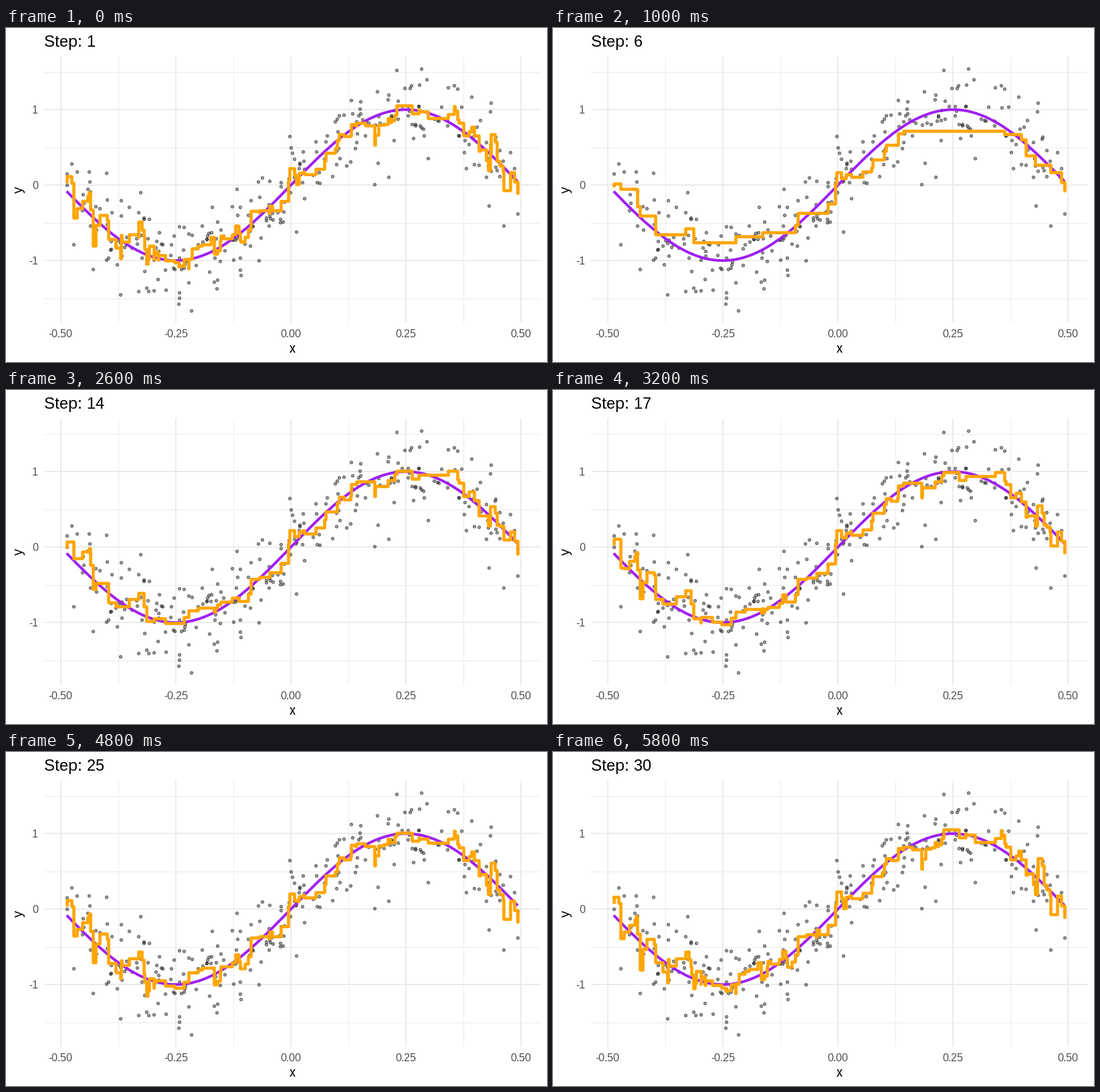
Write a matplotlib script that moves like this. It is 809 by 500 pixels and loops after 9000 ms.

```python
import math

import matplotlib.pyplot as plt
import numpy as np
from matplotlib.animation import FuncAnimation

W, H, DPI = 809, 500, 100
PX = 72 / DPI  # points per pixel
LEFT, RIGHT, TOP, BOTTOM = 57, 799, 42.5, 440.6
N, STEPS, FRAMES = 300, 30, 45
RATE, DEPTH, LAMBDA, SHARE = 0.3, 3, 1, 0.6  # booster settings

plt.rcParams.update({"font.family": "Liberation Sans", "text.hinting": "native",
                     "text.hinting_factor": 1})


def uniforms(seed, count):
    """Mersenne Twister numbers, with the state filled by a congruential rule."""
    keys = []
    for i in range(50 + 625):
        seed = (69069 * seed + 1) % 2**32
        if i > 50:
            keys.append(seed)
    rng = np.random.RandomState()
    rng.set_state(("MT19937", np.array(keys, dtype=np.uint32), 624))
    return rng.randint(0, 2**32, size=count, dtype=np.uint32) / 2**32


def normals(u):
    """Standard normals by inverting the distribution function."""
    z = np.linspace(-5, 5, 20001)
    cdf = [0.5 * (1 + math.erf(v / math.sqrt(2))) for v in z]
    big = 2**27
    return np.interp((np.floor(big * u[::2]) + u[1::2]) / big, cdf, z)


def make_data():
    u = uniforms(1, 3 * N)
    x = u[:N] - 0.5
    y = np.sin(2 * np.pi * x) + 0.3 * normals(u[N:])
    order = np.argsort(x)
    return x[order], y[order]


def tree(xs, res, depth=DEPTH):
    """Greedy regression tree: its cut points and leaf values, left to right."""
    n, total = len(res), res.sum()
    if depth and n > 1:
        left = np.cumsum(res)[:-1]
        k = np.arange(1, n)
        score = left**2 / (k + LAMBDA) + (total - left) ** 2 / (n - k + LAMBDA)
        i = int(np.argmax(score)) + 1
        if score[i - 1] > total**2 / (n + LAMBDA):
            cuts_l, leaves_l = tree(xs[:i], res[:i], depth - 1)
            cuts_r, leaves_r = tree(xs[i:], res[i:], depth - 1)
            cut = (xs[i - 1] + xs[i]) / 2
            return cuts_l + [cut] + cuts_r, leaves_l + leaves_r
    return [], [total / (n + LAMBDA)]


def boost(x, y):
    """Ensemble curves after 0..STEPS trees, each grown on a random share of rows."""
    rng = np.random.default_rng(1)
    curves = [np.full(N, y.mean())]
    for _ in range(STEPS):
        rows = rng.random(N) < SHARE
        cuts, leaves = tree(x[rows], (y - curves[-1])[rows])
        curves.append(curves[-1] + RATE * np.array(leaves)[np.searchsorted(cuts, x)])
    return curves


x, y = make_data()
curves = boost(x, y)


def curve_at(step):
    """The first step shows the full ensemble, later ones step - 1 trees."""
    return curves[step - 1 if step > 1 else STEPS]


def padded(v):
    pad = 0.05 * (v.max() - v.min())
    return v.min() - pad, v.max() + pad


fig = plt.figure(figsize=(W / DPI, H / DPI), dpi=DPI, facecolor="white")
ax = fig.add_axes([LEFT / W, 1 - BOTTOM / H, (RIGHT - LEFT) / W, (BOTTOM - TOP) / H])
ax.set_xlim(padded(x))
ax.set_ylim(padded(y))
ax.axis("off")


def text(px, py, s, size, color="black", **kw):
    return fig.text(px / W, 1 - py / H, s, fontsize=size * PX, color=color,
                    va="baseline", **kw)


def grid(xs, ys, width):
    style = dict(color="#EBEBEB", lw=width * PX, zorder=1)
    for v in xs:
        ax.axvline(v, **style)
    for v in ys:
        ax.axhline(v, **style)


def to_px(vx, vy):
    px, py = ax.transData.transform((vx, vy))
    return px, H - py


x_ticks = np.arange(-2, 3) / 4
y_ticks = np.arange(-1, 2)
grid(x_ticks[:-1] + 0.125, np.arange(-1.5, 2), 1)
grid(x_ticks, y_ticks, 2)

for v in x_ticks:
    text(to_px(v, 0)[0], 463, f"{v:.2f}", 16, "#4D4D4D", ha="center")
for v in y_ticks:
    text(48, to_px(0, v)[1] + 6, str(v), 16, "#4D4D4D", ha="right")
text((LEFT + RIGHT) / 2, 486, "x", 20, ha="center")
text(25, (TOP + BOTTOM) / 2, "y", 20, ha="center", rotation=90,
     rotation_mode="anchor")
title = text(LEFT, 28, "", 24, ha="left")

ax.scatter(x, y, s=(4.4 * PX) ** 2, facecolor=(0, 0, 0, 0.4),
           edgecolor=(0, 0, 0, 0.5), linewidth=0.95 * PX, zorder=2)
ax.plot(x, np.sin(2 * np.pi * x), color="#A020F0", lw=4 * PX, zorder=3,
        solid_capstyle="butt", solid_joinstyle="round")
(fit,) = ax.plot(x, curve_at(1), color="#FFA500", lw=4.6 * PX, zorder=4,
                 drawstyle="steps-post", solid_capstyle="butt",
                 solid_joinstyle="round")


def update(i):
    step = min(i + 1, STEPS)
    fit.set_ydata(curve_at(step))
    title.set_text(f"Step: {step}")
    return fit, title


anim = FuncAnimation(fig, update, frames=FRAMES, interval=200, repeat=True)
plt.show()
```
